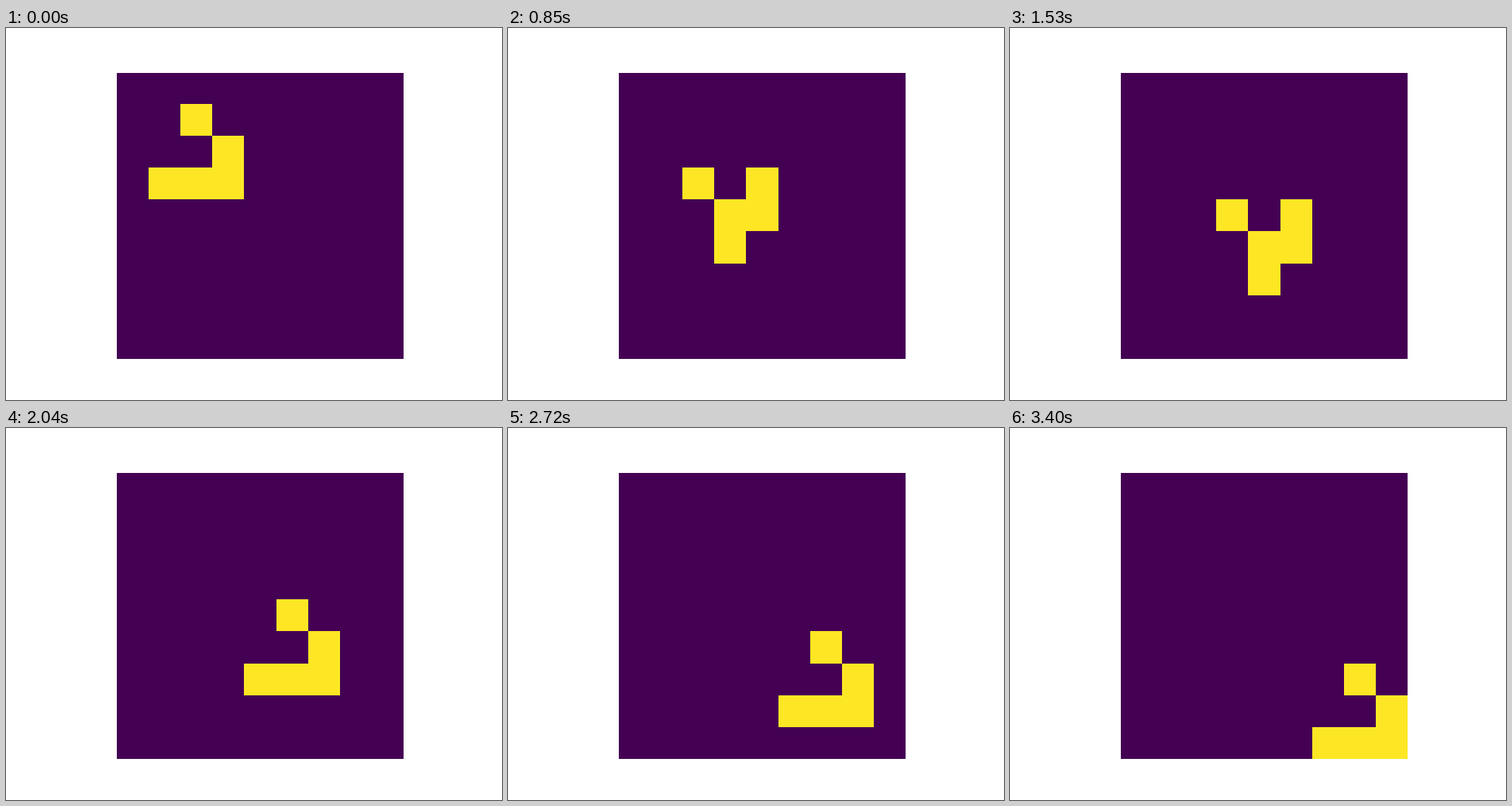
An HTML page with a canvas for the animation above (3570 ms loop, 640 by 480 pixels).

```html
<!DOCTYPE html>
<html lang="en">
<head>
<meta charset="utf-8">
<title>Glider</title>
<style>
  html, body { margin: 0; width: 100%; height: 100%; overflow: hidden; background: #fff; }
  canvas { display: block; }
</style>
</head>
<body>
<canvas id="stage" width="640" height="480"></canvas>
<script>
const SIZE = 9, STEP = 170, COUNT = 21;
const LEFT = 143, TOP = 58, RIGHT = 513, BOTTOM = 427;
const PITCH = 369.6 / SIZE;
const ctx = document.getElementById('stage').getContext('2d');

// Cell edges snapped to whole pixels
const edgeX = i => Math.round(143.2 + i * PITCH);
const edgeY = i => Math.max(TOP, Math.floor(57.6 + i * PITCH));

const emptyGrid = () => Array.from({ length: SIZE }, () => Array(SIZE).fill(0));

function neighbours(grid, x, y) {
  let sum = -grid[y][x];
  for (let dy = -1; dy <= 1; dy++)
    for (let dx = -1; dx <= 1; dx++)
      sum += grid[y + dy]?.[x + dx] ?? 0;
  return sum;
}

// Conway's Game of Life
const evolve = grid => grid.map((row, y) => row.map((alive, x) => {
  const n = neighbours(grid, x, y);
  return n === 3 || (alive && n === 2) ? 1 : 0;
}));

const first = emptyGrid();
for (const [x, y] of [[2, 1], [3, 2], [1, 3], [2, 3], [3, 3]]) first[y][x] = 1;
const generations = [first];
while (generations.length < COUNT) generations.push(evolve(generations.at(-1)));

function draw(grid) {
  ctx.fillStyle = '#fff';
  ctx.fillRect(0, 0, 640, 480);
  ctx.fillStyle = '#440154';
  ctx.fillRect(LEFT, TOP, RIGHT - LEFT, BOTTOM - TOP);
  ctx.fillStyle = '#fde725';
  grid.forEach((row, y) => row.forEach((alive, x) => {
    if (!alive) return;
    const left = edgeX(x), top = edgeY(y);
    ctx.fillRect(left, top, edgeX(x + 1) - left, edgeY(y + 1) - top);
  }));
}

function tick(now) {
  draw(generations[Math.floor(now / STEP) % COUNT]);
  requestAnimationFrame(tick);
}

draw(first);
requestAnimationFrame(tick);
</script>
</body>
</html>
```
